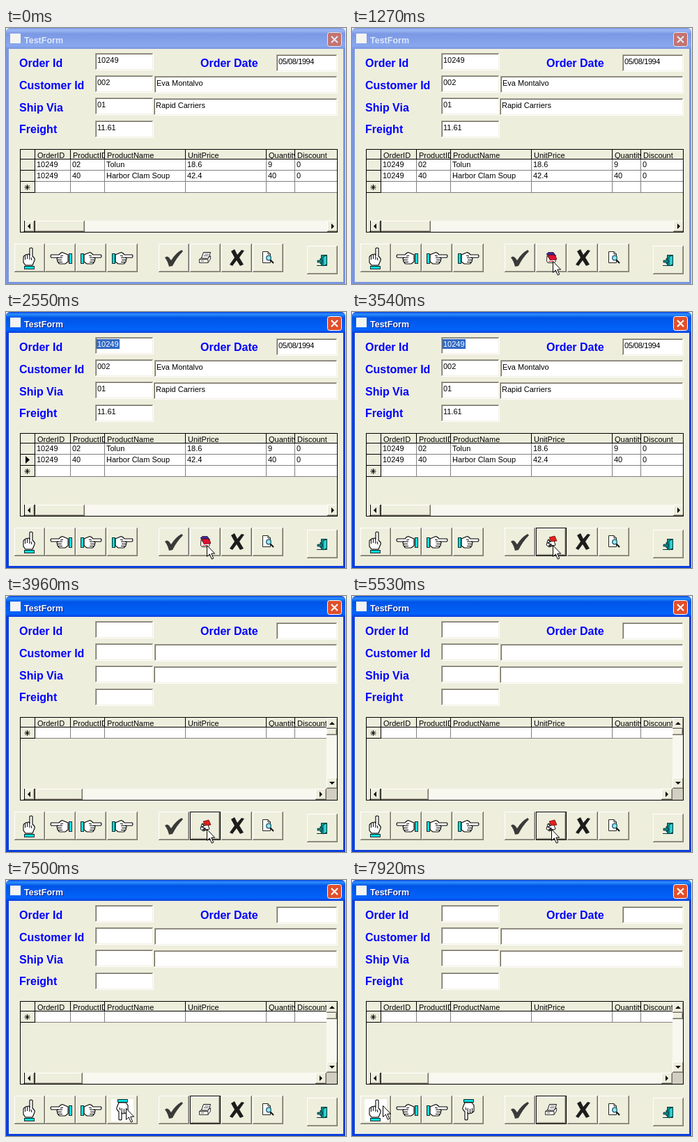
An HTML page for the animation above (8000 ms loop, 488x368 px).

```html
<!DOCTYPE html>
<html lang="en">
<head>
<meta charset="utf-8">
<title>TestForm</title>
<style>
  html, body { margin: 0; width: 100%; height: 100%; overflow: hidden; }
  svg { display: block; width: 488px; height: 368px; }
  text { font: 11px "Liberation Sans", Arial, sans-serif; white-space: pre; }
  .label { font-size: 16px; font-weight: bold; fill: #00f; }
  .title { font-size: 12.5px; font-weight: bold; }
  rect, .crisp { shape-rendering: crispEdges; }
</style>
</head>
<body>
<svg id="stage" viewBox="0 0 488 368"></svg>
<script>
const LOOP = 8000;
const FACE = '#eeeedd', SHADE = '#aca899', DARK = '#716f64', LINE = '#808080';

const rect = (x, y, w, h, fill, extra = '') =>
  `<rect x="${x}" y="${y}" width="${w}" height="${h}" fill="${fill}" ${extra}/>`;
const path = (d, fill = 'none', stroke = 'none', extra = '') =>
  `<path d="${d}" fill="${fill}" stroke="${stroke}" ${extra}/>`;
const text = (x, y, s, extra = '') => `<text x="${x}" y="${y}" ${extra}>${s}</text>`;
const at = (x, y, body, more = '') => `<g transform="translate(${x} ${y}) ${more}">${body}</g>`;
const during = (from, to, body) => `<g data-from="${from}" data-to="${to}">${body}</g>`;

// Two-pixel bevel: outer and inner colours for the lit and shaded edges.
function bevel(x, y, w, h, fill, [a, b, c, d]) {
  return rect(x, y, w, h, d) + rect(x, y, w - 1, h - 1, a) +
    rect(x + 1, y + 1, w - 2, h - 2, c) + rect(x + 1, y + 1, w - 3, h - 3, b) +
    rect(x + 2, y + 2, w - 4, h - 4, fill);
}
const field = (x, y, w, h) => bevel(x, y, w, h, '#fff', [SHADE, DARK, '#f1efe2', '#fff']);
const button = (x, y, w = 44, h = 41) => bevel(x, y, w, h, FACE, ['#fff', FACE, SHADE, DARK]);

function frame(active) {
  const [edge, top, mid, low, close, ink] = active
    ? ['#0a3fdc', '#2b90ff', '#0054e6', '#0263fb', '#e0502c', '#fff']
    : ['#7a96df', '#9db9f4', '#7b98e4', '#88a7ee', '#c4736f', '#dfe8fb'];
  const id = active ? 'on' : 'off';
  return `<linearGradient id="${id}" x2="0" y2="1">
      <stop stop-color="${edge}"/><stop offset=".1" stop-color="${top}"/>
      <stop offset=".28" stop-color="${mid}"/><stop offset=".85" stop-color="${low}"/>
      <stop offset="1" stop-color="${edge}"/></linearGradient>` +
    path('M0 368V7Q0 0 7 0H480Q487 0 487 7V368Z', edge) +
    path('M0 30V7Q0 0 7 0H480Q487 0 487 7V30Z', `url(#${id})`) +
    rect(4, 30, 480, 335, FACE) +
    rect(6, 8, 15, 14, '#f4f4f0') +
    (active ? text(27, 23, 'TestForm', 'class="title" fill="#0a1883"') : '') +
    text(26, 22, 'TestForm', `class="title" fill="${ink}"`) +
    `<rect x="461.5" y="6.5" width="20" height="20" rx="3" fill="${close}" stroke="${ink}" style="shape-rendering:auto"/>` +
    path('M467 12l9 9m0-9l-9 9', 'none', ink, 'stroke-width="2.2"');
}

function form() {
  const labels = [[19, 56, 'Order Id'], [279, 56, 'Order Date'], [19, 88, 'Customer Id'],
    [19, 120, 'Ship Via'], [19, 151, 'Freight']];
  const fields = [[128, 36, 84, 25], [388, 38, 88, 25], [128, 68, 84, 25], [213, 69, 263, 25],
    [128, 100, 84, 25], [212, 101, 264, 25], [128, 133, 84, 25]];
  return labels.map(([x, y, s]) => text(x, y, s, 'class="label"')).join('') +
    fields.map(f => field(...f)).join('');
}

const values = () =>
  text(131, 50, '10249') + text(391, 52, '05/08/1994', 'letter-spacing="-.4"') +
  text(131, 82, '002') + text(216, 83, 'Eva Montalvo') +
  text(131, 114, '01') + text(215, 115, 'Rapid Carriers') + text(131, 147, '11.61');

const COLUMNS = [[41, 'OrderID'], [92, 'ProductID'], [141, 'ProductName'],
  [257, 'UnitPrice'], [373, 'Quantity'], [414, 'Discount']];

function scrollButton(x, y, dx, dy) {
  const angle = Math.atan2(dy, dx) * 180 / Math.PI;
  return button(x, y, 16, 16) + at(x + 8, y + 8, path('M-2-4L2 0L-2 4Z', '#000'), `rotate(${angle})`);
}

function grid(data, right) {
  const rows = data.length + 1, height = rows * 16;
  let out = rect(21, 175, 454, 118, FACE) + rect(42, 189, right - 42, height, '#fff');
  for (let i = 1; i <= rows; i++) {
    out += rect(42, 188 + i * 16, right - 42, 1, LINE) + rect(21, 188 + i * 16, 21, 1, '#000');
  }
  out += rect(21, 188, right - 21, 1, '#000');
  COLUMNS.forEach(([x, name], i) => {
    const end = i < 5 ? COLUMNS[i + 1][0] : right;
    out += `<svg x="${x}" y="175" width="${end - x}" height="14">${text(4, 12, name)}</svg>` +
      rect(x, 175, 1, 14, '#000') + rect(x, 189, 1, height, i ? LINE : '#000');
    data.forEach((row, r) => out += text(x + 3, 200 + r * 16, row[i]));
  });
  out += at(30.5, 181 + height, path('M-4 0H4M0-4V4M-3-3L3 3M3-3L-3 3', 'none', '#000'));
  out += rect(21, 277, right - 21, 16, '#f8f8f0') + rect(21, 277, 5, 16, FACE) +
    scrollButton(25, 277, -1, 0) + rect(26, 277, 1, 16, '#000') + rect(41, 277, 1, 16, '#000') +
    button(42, 277, right > 470 ? 71 : 68, 16) + scrollButton(right > 470 ? 461 : 444, 277, 1, 0);
  return out + rect(20.5, 174.5, 455, 119, 'none', 'stroke="#000"');
}

const verticalScroll = () =>
  rect(460, 175, 15, 102, '#f8f8f0') + scrollButton(460, 175, 0, -1) +
  button(460, 191, 15, 9) + scrollButton(460, 261, 0, 1) + rect(460, 277, 15, 16, '#d2cfc2') +
  rect(475, 174, 1, 120, '#000');

// Pointing hand, finger to the right, in a 32 x 20 box.
const hand = rect(1, 3, 4, 14, '#00dede', 'stroke="#000" stroke-width=".8"') +
  path('M6 5L13 2Q15 1 17 3L19 5H30Q32 7 30 9H21Q23 11 21 12.5Q22 15 20 15.5Q20 18 17 18H10L6 15Z',
    '#fff', '#000', 'stroke-width="1.1"') +
  path('M14 9.2H21M15 12.4H21M14 15.4H20M13 6l4 1', 'none', '#000');
const handUp = at(43, 347, hand, 'rotate(-90) scale(1 -1)');
const handLeft = at(95, 321, hand, 'scale(-1 1)');
const handRight = x => at(x, 321, hand);
const handDown = at(157, 314, hand, 'rotate(90) scale(1 -1)');
const lit = x => rect(x, 315, 32, 32, '#fff');

const check = fill => path('M0 11Q3 8 6 11L9 15Q15 5 24 0L26 2Q17 11 11 23L6 24Q4 16 0 11Z', fill);

const note = path('M.5 10.5L4 8H14L16.5 5.5V10L13 15.5H.5ZM13 15.5V10.5H.5', '#fff', '#333') +
  path('M6.5.5H16.5L13.5 9H3.5Z', '#fff', '#111') +
  path('M8 3H14M7 5.5H13M3 13H7', 'none', '#555');
const redNote = path('M2 5L5 9L14 8V14L12 15.5H3L1.5 13Z', '#fff', '#222') +
  path('M1 3L4 .5H11L15 6L5 6Z', '#43259a', '#111', 'stroke-width=".7"') +
  path('M3 4.5L12 4L15.5 8.5V11L6 11.5Z', '#e01030', '#400', 'stroke-width=".7"') +
  path('M4 13.5H11', 'none', '#d81838');
const openNote = path('M3 6L11 4L14 13L5 16L1 13Z', '#fff', '#111') +
  path('M5 2L13 0L16 7L8 8Z', '#e3201c', '#500', 'stroke-width=".7"') +
  path('M3 5l4 3l-4 2l5 2l-4 2h7', 'none', '#111', 'stroke-width="1.3"');

const preview = path('M.5.5H8L11.5 4V16.5H.5ZM8 .5V4H11.5', '#fff', '#222') +
  '<circle cx="9" cy="9.5" r="3.3" fill="#9ee4ea" stroke="#145b70" stroke-width="1.3"/>' +
  path('M11.5 12.5L16 17', 'none', '#111', 'stroke-width="2"');
const exit = path('M6.5.5H14.5V15.5H6.5Z', '#00a0a0', '#033') + path('M9 3L14.5.5V14L9 16Z', '#3cc', '#033') +
  path('M0 15.5H9', 'none', '#033') +
  path('M1 8H5V5L9 9.5L5 13V11H1Z', '#0a8084', '#022', 'stroke-width=".7"');

function toolbar() {
  const cross = 'M2 3L7 0L11 8L17 1L21 2L14 12L20 22L15 24L10 16L4 24L0 22L7 12Z';
  const grayCheck = at(228, 319, check('#3a3a38'));
  return [12, 56, 100, 145, 219, 264, 309, 354].map(x => button(x, 310)).join('') +
    button(432, 313) +
    during(3540, LOOP, rect(264, 310, 44, 41, '#000') + button(265, 311, 42, 39)) +
    during(7920, LOOP, lit(18)) + handUp +
    during(7780, 7920, lit(62)) + handLeft + handRight(106) +
    during(0, 6510, handRight(151)) +
    during(6510, 7780, lit(151)) + during(6510, LOOP, handDown) +
    during(0, 6370, grayCheck) +
    during(6370, 6510, at(226, 320, check('#064d08')) + at(225, 319, check('#0aa40f'))) +
    during(6510, LOOP, grayCheck) +
    during(0, 850, at(277, 322, note)) + during(850, 3540, at(278, 322, redNote)) +
    during(3540, 6370, at(278, 322, openNote)) + during(6370, LOOP, at(277, 322, note)) +
    at(321, 318, path(cross, '#1c1c1c')) + at(368, 321, preview) + at(446, 326, exit);
}

const pointer = path('M.5.5V16.5L4.3 13L7.3 20.2L9.7 19.2L6.8 12.2H11.6Z', '#fff', '#000');

// Pointer position from each time on: time, x, y.
const POINTER = [[710, 291, 359], [850, 289, 347], [990, 288, 337], [1270, 288, 335],
  [5530, 286, 335], [5670, 284, 335], [5810, 282, 335], [5950, 265, 334], [6370, 225, 330],
  [6510, 177, 328], [6650, 174, 328], [6930, 173, 328], [7500, 172, 328], [7640, 138, 327],
  [7780, 80, 326], [7920, 44, 324]];

const ORDER = [['10249', '02', 'Tolun', '18.6', '9', '0'],
  ['10249', '40', 'Harbor Clam Soup', '42.4', '40', '0']];

const stage = document.getElementById('stage');
stage.innerHTML = rect(0, 0, 488, 368, '#eef1fa') +
  during(0, 1410, frame(false)) + during(1410, LOOP, frame(true)) + form() +
  during(0, 3960, values() + grid(ORDER, 475)) +
  during(1410, 3960, rect(130, 39, 33, 14, '#316ac5') + text(131, 50, '10249', 'fill="#fff"')) +
  during(2550, 2970, path('M28 207L34 212.5L28 218Z', '#000')) +
  during(3960, LOOP, grid([], 460) + verticalScroll()) +
  rect(476, 270, 8, 30, FACE) + toolbar() + `<g id="pointer">${pointer}</g>`;

const timed = [...stage.querySelectorAll('[data-from]')];
const arrow = document.getElementById('pointer');

function draw(now) {
  const t = now % LOOP;
  for (const el of timed) {
    el.style.display = t >= +el.dataset.from && t < +el.dataset.to ? '' : 'none';
  }
  const spot = POINTER.filter(p => p[0] <= t).pop();
  arrow.style.display = spot ? '' : 'none';
  if (spot) arrow.setAttribute('transform', `translate(${spot[1]} ${spot[2]})`);
}

const start = performance.now();
function tick() {
  draw(performance.now() - start);
  requestAnimationFrame(tick);
}
tick();
</script>
</body>
</html>
```
